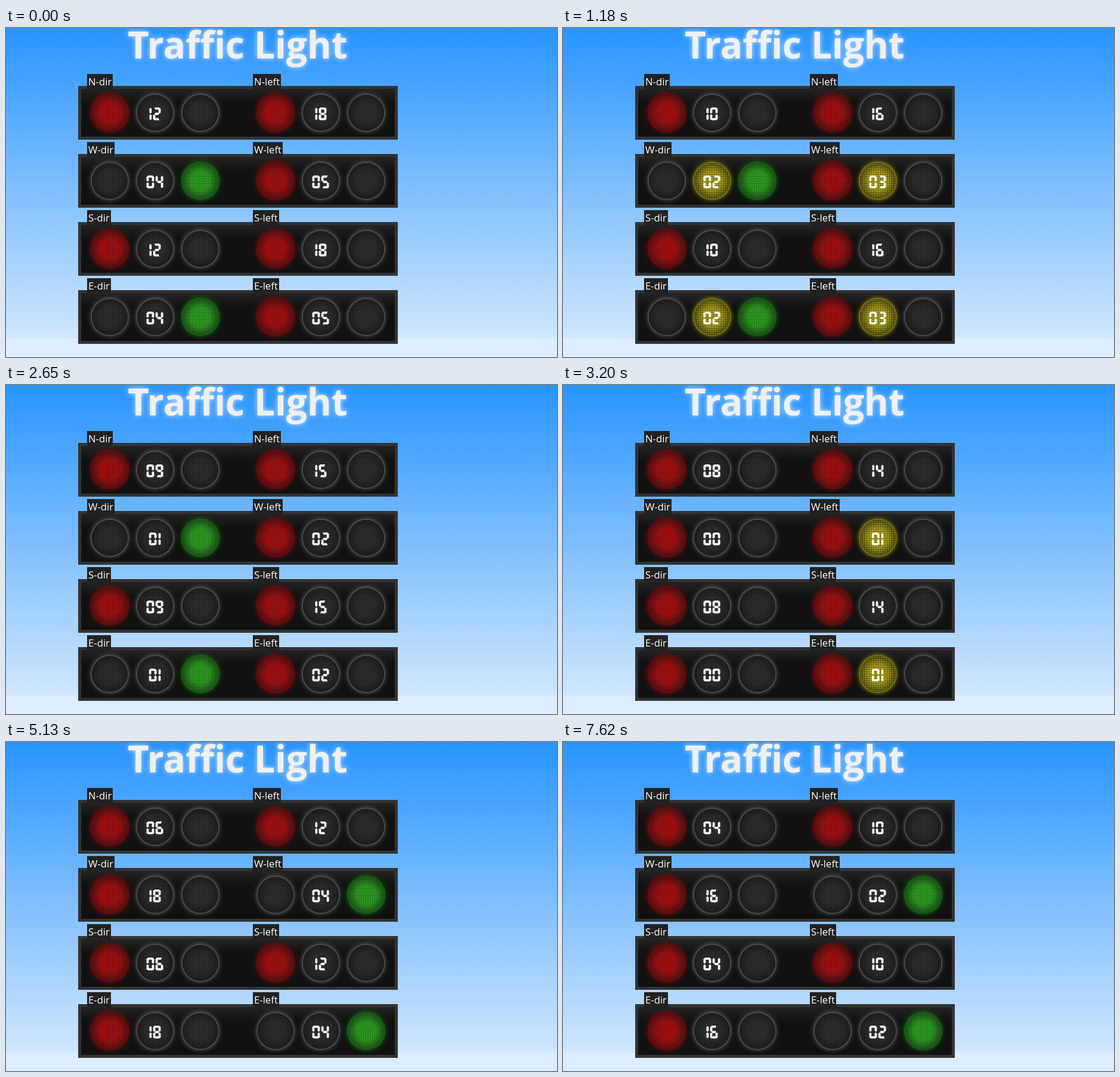
Recreate the animation shown at these times as an HTML page with a canvas. Size 924 by 551 pixels, loop 8000 ms.

```html
<!DOCTYPE html>
<html lang="en">
<head>
<meta charset="utf-8">
<title>Traffic Light</title>
<style>
  html, body { margin: 0; width: 100%; height: 100%; overflow: hidden; }
  body {
    position: relative;
    background: linear-gradient(#2894ff, #d1e7fd) 0 0 / 100% 520px no-repeat #dbedfe;
    font-family: "Open Sans", "Noto Sans", sans-serif;
  }
  canvas { position: absolute; left: 0; top: 0; }
  h1 {
    position: absolute; left: 204px; top: -15px; margin: 0;
    font-size: 62px; font-weight: 700; white-space: nowrap;
    font-variant-ligatures: none;
    color: #f0f0f0; text-shadow: 0 0 8px rgba(255, 255, 255, .75);
  }
  .label {
    position: absolute; padding: 0 2px;
    font-size: 16.7px; line-height: 25px; white-space: nowrap;
    color: #fff; background: #222;
  }
</style>
</head>
<body>
<canvas id="stage" width="924" height="551"></canvas>
<h1>Traffic Light</h1>
<script>
const LOOP = 8000;
const ROWS = ["N", "W", "S", "E"];
const COLS = [{ name: "dir", x: 136 }, { name: "left", x: 414 }];
const ROW_STEP = 114;
const RADIUS = 31;

// Start of each count and end of its yellow flash, per column
const TICKS = [
  [0, 170, 1180, 2190, 3200, 4120, 5130, 6140, 7160],
  [0, 170, 1180, 2190, 3200, 4210, 5130, 6140, 7160]
];
const FLASH_END = [
  [0, 720, 1640, 2650, 3660, 4580, 5590, 6610, 7620],
  [0, 720, 1730, 2650, 3660, 4580, 5590, 6610, 7620]
];

const PAINT = {
  off:    { base: "#1e1e1e", dot: "#363636", ring: "#494949", glow: "#555" },
  red:    { base: "#760b0c", dot: "#ba1414", ring: "#620c0f", glow: "#900" },
  yellow: { base: "#665e06", dot: "#cabe28", ring: "#746c10", glow: "#880" },
  green:  { base: "#1d7616", dot: "#36ac28", ring: "#175a14", glow: "#070" }
};

// Lit segments of each digit: a top, b-c right, d bottom, e-f left, g middle
const DIGITS = ["abcdef", "bc", "abged", "abgcd", "fgbc",
                "afgcd", "afgedc", "fabc", "abcdefg", "abcdfg"];
const DIGIT_W = 12.8, DIGIT_H = 21.5, DIGIT_GAP = 2.4, STROKE = 3.8;

const ctx = document.getElementById("stage").getContext("2d");

for (let row = 0; row < ROWS.length; row++) {
  for (const col of COLS) {
    const label = document.createElement("div");
    label.className = "label";
    label.textContent = ROWS[row] + "-" + col.name;
    label.style.left = col.x + "px";
    label.style.top = 77 + row * ROW_STEP + "px";
    document.body.append(label);
  }
}

function signal(t, row, col) {
  const k = TICKS[col].findLastIndex(start => t >= start);
  const cross = row % 2 === 1;
  let count, green = false;
  if (!cross) {
    count = (col ? 18 : 12) - k;
  } else if (col) {
    count = (k <= 5 ? 5 : 10) - k;
    green = k >= 5;
  } else {
    count = (k <= 4 ? 4 : 24) - k;
    green = k < 4;
  }
  const yellow = count >= 1 && count <= 3 && t < FLASH_END[col][k];
  return { count, green, yellow };
}

function disc(x, y, r) {
  ctx.beginPath();
  ctx.arc(x, y, r, 0, 7);
}

function lamp(x, y, kind) {
  const p = PAINT[kind];
  ctx.save();
  ctx.shadowColor = p.glow;
  ctx.shadowBlur = 7;
  ctx.fillStyle = p.ring;
  disc(x, y, RADIUS + 1);
  ctx.fill();
  ctx.restore();

  ctx.save();
  disc(x, y, RADIUS - 1);
  ctx.clip();
  ctx.fillStyle = p.base;
  ctx.fillRect(x - 32, y - 32, 64, 64);
  ctx.fillStyle = p.dot;
  for (let dx = -31; dx < 32; dx += 3) {
    for (let dy = -31; dy < 32; dy += 3) ctx.fillRect(x + dx, y + dy, 2, 2);
  }
  const shade = ctx.createRadialGradient(x, y, 16, x, y, RADIUS);
  shade.addColorStop(0, "rgba(17,17,17,0)");
  shade.addColorStop(1, "rgba(17,17,17,.55)");
  ctx.fillStyle = shade;
  ctx.fillRect(x - 32, y - 32, 64, 64);
  ctx.restore();
}

function polygon(points) {
  ctx.beginPath();
  for (const [x, y] of points) ctx.lineTo(x, y);
  ctx.fill();
}

const digitWidth = d => d === "1" ? 4.5 : DIGIT_W;

function digit(d, x, y) {
  const mid = DIGIT_H / 2, half = STROKE / 2;
  const right = x + digitWidth(d);
  const bar = (outer, inner) => polygon([
    [x + 2.2, outer], [right - 2.2, outer],
    [right - STROKE, inner], [x + STROKE, inner]
  ]);
  const post = (left, top) => {
    const a = top + .6, b = top + mid - .3;
    polygon([
      [left, a + half], [left + half, a], [left + STROKE, a + half],
      [left + STROKE, b - half], [left + half, b], [left, b - half]
    ]);
  };
  const middle = () => polygon([
    [x + 2.4, y + mid], [x + 4.2, y + mid - half], [right - 4.2, y + mid - half],
    [right - 2.4, y + mid], [right - 4.2, y + mid + half], [x + 4.2, y + mid + half]
  ]);
  const draw = {
    a: () => bar(y, y + STROKE),
    b: () => post(right - STROKE, y),
    c: () => post(right - STROKE, y + mid),
    d: () => bar(y + DIGIT_H, y + DIGIT_H - STROKE),
    e: () => post(x, y + mid),
    f: () => post(x, y),
    g: middle
  };
  for (const s of DIGITS[d]) draw[s]();
}

function counter(n, x, y) {
  const [tens, ones] = String(n).padStart(2, "0");
  const width = digitWidth(tens) + DIGIT_GAP + digitWidth(ones);
  const left = x - .4 - width / 2;
  ctx.fillStyle = "#f5f8f6";
  digit(tens, left, y - 9);
  digit(ones, left + digitWidth(tens) + DIGIT_GAP, y - 9);
}

function panel(y) {
  ctx.fillStyle = "#333";
  ctx.fillRect(121, y, 536, 90);
  const fill = ctx.createLinearGradient(0, y + 5, 0, y + 85);
  fill.addColorStop(0, "#222");
  fill.addColorStop(.03, "#212121");
  fill.addColorStop(.3, "#111");
  ctx.fillStyle = fill;
  ctx.fillRect(126, y + 5, 526, 80);
}

function render(t) {
  ctx.clearRect(0, 0, 924, 551);
  for (let row = 0; row < ROWS.length; row++) {
    const top = 97 + row * ROW_STEP;
    const y = top + 45;
    panel(top);
    for (let col = 0; col < COLS.length; col++) {
      const s = signal(t, row, col);
      const x = COLS[col].x + 38;
      lamp(x, y, s.green ? "off" : "red");
      lamp(x + 76, y, s.yellow ? "yellow" : "off");
      lamp(x + 152, y, s.green ? "green" : "off");
      counter(s.count, x + 76, y);
    }
  }
}

function frame() {
  render(performance.now() % LOOP);
  requestAnimationFrame(frame);
}
frame();
</script>
</body>
</html>
```
